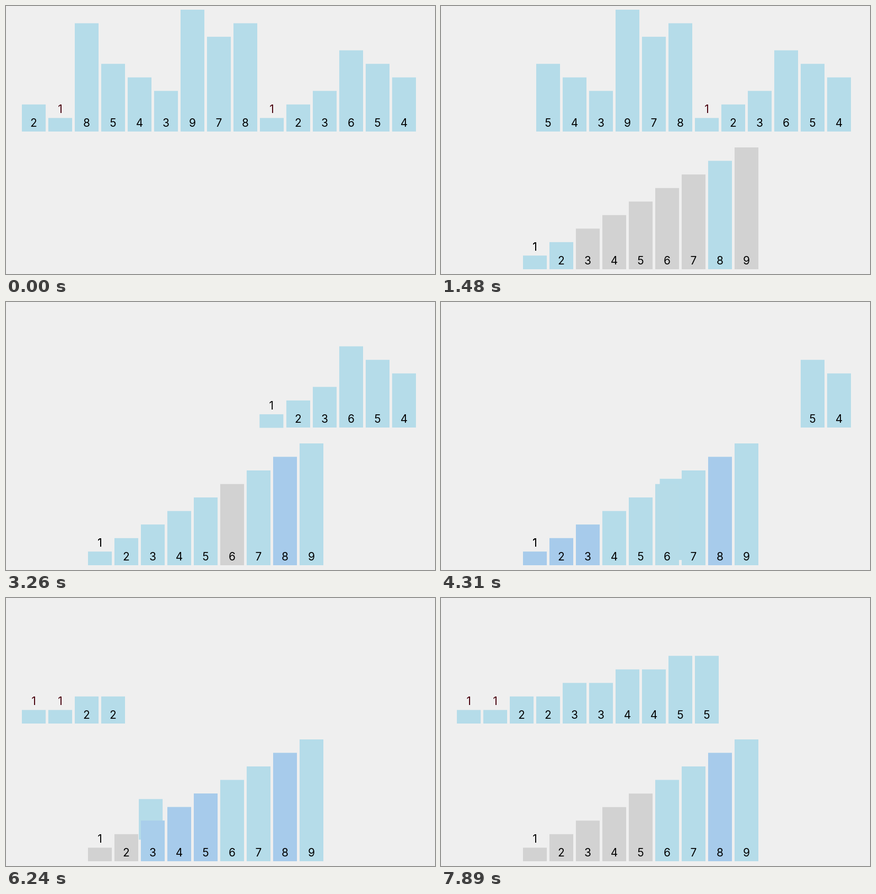
Recreate the animation shown at these times as an HTML page with a canvas. Size 811x506 px, loop 8 s.

```html
<!DOCTYPE html>
<html lang="en">
<head>
<meta charset="utf-8">
<title>Counting sort</title>
<style>
  html, body { margin: 0; width: 100%; height: 100%; overflow: hidden; background: #efefef; }
  canvas { display: block; }
</style>
</head>
<body>
<canvas id="stage" width="811" height="506"></canvas>
<script>
const ctx = document.getElementById('stage').getContext('2d');

const LOOP = 8000, START = 607, STEP = 290.8;
const UNIT = 230 / 9, BAR = 45, PITCH = 50;
const ROW = { x: 30, base: 237 };
const BUCKETS = { x: 155, base: 497 };
const BACKGROUND = '#efefef';
const TINTS = [[210, 210, 210], [181, 220, 233], [167, 203, 235]];
const BLACK = '#000', MAROON = '#48000c';

const values = [2, 1, 8, 5, 4, 3, 9, 7, 8, 1, 2, 3, 6, 5, 4];
const order = values.map((_, i) => i).sort((a, b) => values[a] - values[b] || a - b);
const items = values.map((value, index) => ({ value, index, rank: order.indexOf(index) }));

const lerp = (a, b, p) => a + (b - a) * p;

// Quartic ease in and out, clamped to 0..1
function ease(t) {
  t = Math.min(1, Math.max(0, t));
  return t < 0.5 ? 8 * t ** 4 : 1 - 8 * (1 - t) ** 4;
}

function tint(count) {
  const low = Math.min(1, Math.floor(count));
  const rgb = TINTS[low].map((c, i) => Math.round(lerp(c, TINTS[low + 1][i], count - low)));
  return `rgb(${rgb})`;
}

function drawBar(x, base, value, fill, ink = BLACK) {
  const height = value * UNIT;
  ctx.fillStyle = fill;
  ctx.fillRect(x, base - height, BAR, height);
  ctx.fillStyle = ink;
  ctx.fillText(value, x + BAR / 2, (value === 1 ? base - height : base) - 9);
}

function draw(time) {
  const step = (time - START) / STEP;
  const counts = Array(10).fill(0);

  ctx.globalAlpha = 1;
  ctx.fillStyle = BACKGROUND;
  ctx.fillRect(0, 0, 811, 506);
  ctx.font = '21px Inter, "Open Sans", sans-serif';
  ctx.textAlign = 'center';

  for (const { value, index, rank } of items) {
    const sent = ease(step - index);
    const back = ease(step - values.length - rank);
    const bucketX = BUCKETS.x + PITCH * (value - 1);
    const x = lerp(lerp(ROW.x + PITCH * index, bucketX, sent), ROW.x + PITCH * rank, back);
    const base = lerp(ROW.base, BUCKETS.base, sent - back);
    const resting = sent === 0 || back === 1;
    counts[value] += sent - back;
    drawBar(x, base, value, tint(1), resting && value === 1 ? MAROON : BLACK);
  }

  ctx.globalAlpha = ease(step + 1);
  for (let value = 1; value <= 9; value++) {
    drawBar(BUCKETS.x + PITCH * (value - 1), BUCKETS.base, value, tint(counts[value]));
  }
}

const begin = performance.now();
function tick() {
  draw((performance.now() - begin) % LOOP);
  requestAnimationFrame(tick);
}
tick();
</script>
</body>
</html>
```
